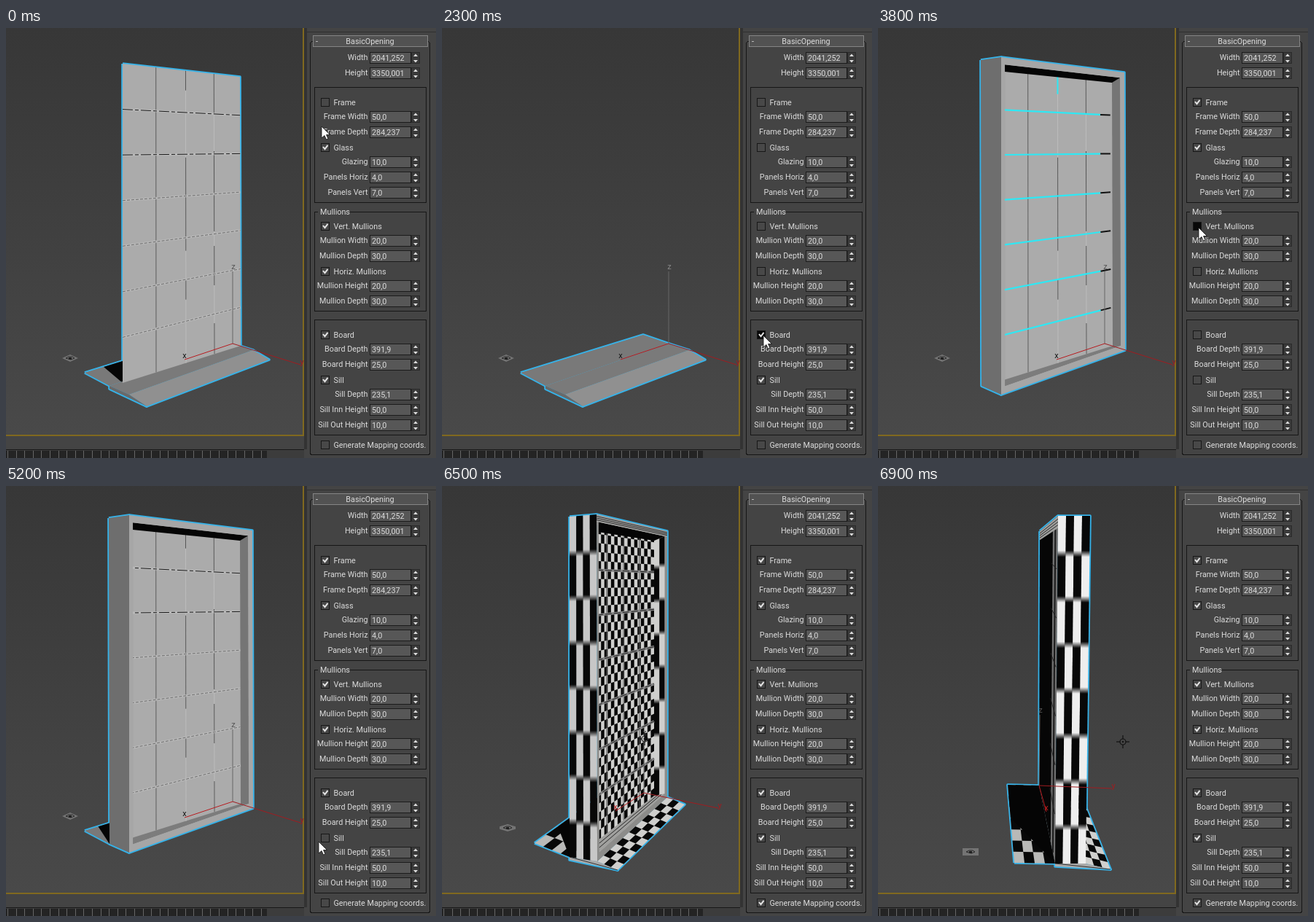
These frames come from a looping animation (590 by 590 pixels, 7000 ms). An HTML page with a canvas:

```html
<!DOCTYPE html>
<html lang="en">
<head>
<meta charset="utf-8">
<title>Window options</title>
<style>
html, body { margin: 0; width: 100%; height: 100%; overflow: hidden; background: #444; }
canvas, svg { position: absolute; left: 0; top: 0; width: 590px; height: 590px; }
text { font: 10.8px Roboto, sans-serif; fill: #dcdcdc; }
rect { shape-rendering: crispEdges; }
</style>
</head>
<body>
<canvas id="view" width="590" height="590"></canvas>
<svg id="panel" viewBox="0 0 590 590"></svg>
<script>
const LOOP = 7000, STEP = 100;
const ctx = document.getElementById('view').getContext('2d');
const panel = document.getElementById('panel');

// Option: initial state, then the times at which it flips
const options = {
  frame: [false, 3200],
  glass: [true, 300, 2700],
  vert: [true, 900, 3900],
  horiz: [true, 1700, 4300],
  board: [true, 2400, 5100],
  sill: [true, 2500, 5600],
  map: [false, 6200]
};
const isOn = (name, t) => {
  const [start, ...flips] = options[name];
  return start !== (flips.filter(f => f <= t).length % 2 === 1);
};
const isPressed = (name, t) => options[name].slice(1).some(f => t < f && f - t <= STEP);

// Pointer path: time, x, y
const pointer = [
  [0, 433, 135], [200, 438, 165], [300, 439, 166], [700, 441, 278], [900, 441, 278],
  [1500, 440, 338], [1700, 440, 338], [2000, 441, 422], [2300, 441, 422], [2500, 440, 484],
  [2700, 440, 166], [2900, 440, 166], [3200, 434, 97], [3300, 434, 97], [3500, 440, 274],
  [3900, 440, 274], [4100, 441, 336], [4400, 441, 336], [5000, 441, 420], [5100, 440, 424],
  [5200, 429, 488], [5400, 434, 484], [5600, 434, 484], [6000, 435, 571], [7000, 435, 571]
];

// Corner positions in the three key views of the orbit.
// l/r = left/right, f/b = front/back, t/b = top/bottom; g = glass
const views = {
  lbt: [141, 44, 175, 42, 247, 41],    lft: [169, 40, 212, 39, 291, 41],
  rft: [338, 61, 309, 62, 258, 62],    rbt: [311, 64, 277, 60, 222, 62],
  lbb: [142, 491, 175, 509, 243, 518], lfb: [169, 503, 213, 515, 285, 518],
  rfb: [339, 442, 309, 427, 255, 411], rbb: [311, 433, 277, 421, 221, 411],
  gtl: [160, 49, 200, 51, 276, 41],    gtr: [321, 67, 291, 67, 246, 62],
  gbr: [322, 436, 291, 425, 243, 411], gbl: [160, 487, 200, 497, 272, 518],
  boardNear: [108, 473, 127, 490, 187, 517], boardFar: [276, 421, 238, 410, 178, 410],
  sillNear: [193, 519, 241, 527, 319, 526],  sillFar: [361, 455, 333, 437, 275, 415],
  axisX: [245, 455, 238, 446, 231, 447],     axisY: [404, 462, 379, 442, 321, 415],
  axisZ: [311, 334, 277, 345, 222, 314],     eye: [88, 453, 90, 469, 127, 502]
};

const mix = (a, b, k) => a + (b - a) * k;
const mixPt = (p, q, k) => [mix(p[0], q[0], k), mix(p[1], q[1], k)];
const clamp = v => Math.max(0, Math.min(1, v));
const gray = v => `rgb(${v},${v},${v})`;

function poseAt(t) {
  const k = clamp((t - 6300) / 200) + clamp((t - 6500) / 400);
  const i = Math.min(1, Math.floor(k)) * 2;
  const pose = {};
  for (const [name, v] of Object.entries(views))
    pose[name] = mixPt([v[i], v[i + 1]], [v[i + 2], v[i + 3]], k - i / 2);
  return pose;
}

function pointerAt(t) {
  const i = pointer.findIndex(p => p[0] > t);
  const a = pointer[i - 1], b = pointer[i];
  return mixPt(a.slice(1), b.slice(1), (t - a[0]) / (b[0] - a[0]));
}

// Quads run top-left, top-right, bottom-right, bottom-left
const at = (q, u, v) => mixPt(mixPt(q[0], q[1], u), mixPt(q[3], q[2], u), v);
const part = (q, u0, v0, u1, v1) => [at(q, u0, v0), at(q, u1, v0), at(q, u1, v1), at(q, u0, v1)];

function trace(pts) {
  ctx.beginPath();
  pts.forEach(p => ctx.lineTo(...p));
}
function fill(pts, color) {
  trace(pts);
  ctx.closePath();
  ctx.fillStyle = color;
  ctx.fill();
}
function line(pts, color, width = 1, dash = []) {
  trace(pts);
  ctx.strokeStyle = color;
  ctx.lineWidth = width;
  ctx.setLineDash(dash);
  ctx.stroke();
  ctx.setLineDash([]);
}
function checker(q, cols, rows, light = '#cfcfcd') {
  fill(q, light);
  for (let r = 0; r < rows; r++)
    for (let c = 0; c < cols; c++)
      if ((r + c) % 2)
        fill(part(q, c / cols, r / rows, (c + 1) / cols, (r + 1) / rows), '#080808');
}
// Long columns of cells that blur into each other, cut off at both ends
function softChecker(q, cols, light) {
  const first = .17, span = 7.63, blur = .07;
  for (let c = 0; c < cols; c++) {
    const u = (c + .5) / cols;
    const shade = ctx.createLinearGradient(...at(q, u, 0), ...at(q, u, 1));
    for (let r = 0; r < 8; r++) {
      const color = (r + c) % 2 ? '#080808' : light;
      shade.addColorStop(clamp((r - first + blur) / span), color);
      shade.addColorStop(clamp((r + 1 - first - blur) / span), color);
    }
    fill(part(q, c / cols, 0, (c + 1) / cols, 1), shade);
  }
}
function stripes(q, count) {
  fill(q, '#a0a09e');
  for (let i = 1; i <= count; i++) {
    const v = i / (count + 1);
    line([at(q, 0, v), at(q, 1, v)], '#2a2a2a');
  }
}

const columns = [.284, .537, .778];
const rowsOf = [1, 2, 3, 4, 5, 6].map(k => k / 7);

function drawGlass(q, on) {
  if (on.map) checker(q, 20, 35);
  else fill(q, '#ababab');
  columns.forEach((u, i) => {
    const ends = [at(q, u, 0), at(q, u, 1)];
    line(ends, on.map ? '#555' : '#bcbcbc');
    if (!on.map) line(ends, '#555', 1, [[], [27, 92, 128, 40], [54, 52, 110, 20]][i]);
  });
  if (!on.vert) line([at(q, .537, 0), at(q, .537, .08)], '#2ee8f4', 2);
  rowsOf.forEach((v, i) => {
    const ends = [at(q, 0, v), at(q, 1, v)];
    if (!on.horiz) {
      line([ends[0], at(q, .9, v)], '#2ee8f4', 2.2);
      line([at(q, .9, v), at(q, .985, v)], '#111', 2);
    } else if (on.map) {
      line(ends, '#858585', 3.5);
      line(ends, '#222', 1, [9, 3]);
    } else {
      line(ends, '#b9b9b9', 3);
      line(ends, i < 2 ? '#161616' : '#6c6c6c', 1, i < 2 ? [14, 3, 5, 3] : [4, 2]);
    }
  });
}

function drawFront(front, glass, on) {
  fill(front, on.map ? '#8c8c8a' : '#a6a6a6');
  if (on.map) stripes(part(front, 0, 0, 1, .021), 3);
  const hole = part(front, .03, .021, .965, .979);
  const [a, b, c, d] = hole, [e, f, g, h] = part(glass, 0, .022, 1, 1);
  ctx.save();
  trace(hole);
  ctx.closePath();
  ctx.clip();
  fill(hole, on.map ? '#b4b4b2' : '#7c7c7c');
  if (on.map) {
    softChecker([f, b, c, g], 2, '#cfcfcd');
    stripes([h, g, c, d], 2);
  } else fill([f, b, c, g], '#757575');
  drawGlass(glass, on);
  fill([a, b, f, e, [e[0], a[1]]], '#050505');
  ctx.restore();
}

function drawBack(q) {
  fill(q, '#060606');
  fill(part(q, .72, 0, 1, 1), '#707070');
  line([at(q, .86, .03), at(q, .86, 1)], '#1a1a1a', 2);
  stripes(part(q, 0, 0, 1, .035), 3);
  rowsOf.forEach(v => line([at(q, .65, v - .01), at(q, .95, v + .01)], '#222'));
}

function drawModel(p, on) {
  const front = [p.lft, p.rft, p.rfb, p.lfb];
  const side = [p.lbt, p.lft, p.lfb, p.lbb];
  const back = [p.rbt, p.lbt, p.lbb, p.rbb];
  const glass = [p.gtl, p.gtr, p.gbr, p.gbl];
  const board = [p.boardNear, p.boardFar, p.rbb, p.lbb];
  const flat = [p.lbb, p.rbb, p.rfb, p.lfb];
  const slope = [p.lfb, p.rfb, p.sillFar, p.sillNear];
  const lip = [p.lbb, p.lfb, p.sillNear, [p.lbb[0], p.lbb[1] + 4]];
  const turn = clamp((p.rbb[0] - 311) / -90);
  const pieces = [];
  const add = (outline, paint) => pieces.push({ outline, paint });

  if (on.board) add(board, () => {
    if (on.map) checker(board, 7, 4, '#b9b9b7'); else fill(board, '#797979');
    if (on.frame || on.glass) {
      const u = on.frame ? .11 + .47 * turn : .155;
      fill([mixPt(p.boardNear, p.boardFar, u), p.boardFar, p.rbb, on.frame ? p.lbb : p.gbl], '#050505');
    }
  });
  if (on.sill) {
    add(flat, () => fill(flat, '#7a7a7a'));
    add(slope, () => on.map ? checker(slope, 11, 3) : fill(slope, '#909090'));
    add(lip, () => {
      fill(lip, on.map ? '#aaa' : '#696969');
      if (on.map) line([p.lbb, p.sillNear], '#333');
    });
  }
  if (on.frame) {
    if (p.rbt[0] < p.lbt[0]) add(back, () => drawBack(back));
    if (p.rft[0] > p.lft[0]) add(front, () => drawFront(front, glass, on));
    add(side, () => on.map ? softChecker(side, 4, gray(mix(175, 238, turn))) : fill(side, '#6e6e6e'));
  } else if (on.glass) add(glass, () => drawGlass(glass, on));

  // Selection halo stays visible only around the combined silhouette
  ctx.lineJoin = 'round';
  pieces.forEach(s => line([...s.outline, s.outline[0]], '#35b3ea', 3.6));
  pieces.forEach(s => s.paint());

  if (!on.glass) {
    const bars = [];
    if (on.vert) columns.forEach(u => bars.push([at(glass, u, .01), at(glass, u, .985)]));
    if (on.horiz) rowsOf.forEach(v => bars.push([at(glass, -.015, v), at(glass, 1.01, v)]));
    bars.forEach(b => line(b, '#249fd8', 8));
    bars.forEach(b => line(b, '#3c4850', 4.4));
    bars.forEach(b => line(b, '#aaa5a0', 3, [22, 1]));
  }
}

function label(text, x, y, color) {
  ctx.fillStyle = color;
  ctx.font = '11px Roboto, sans-serif';
  ctx.textAlign = 'center';
  ctx.fillText(text, x, y);
}

function drawAxes(p, on) {
  line([p.rbb, p.axisZ], '#666');
  line([p.rbb, p.axisX], '#b81c20');
  line([p.rbb, p.axisY], '#a01c20');
  const z = p.axisZ, x = p.axisX, y = p.axisY;
  label('z', z[0] + 1, z[1] - 3, on.glass ? '#555' : '#888');
  label('x', x[0], x[1] - 2, on.map ? '#c02020' : '#161616');
  label('y', y[0] + 2, y[1], '#a01c20');
}

function drawEye([x, y], turn) {
  const h = 5;
  fill([[x - 11, y - h * turn], [x, y - h], [x + 11, y - h * turn],
        [x + 11, y + h * turn], [x, y + h], [x - 11, y + h * turn]], '#747474');
  line([[x - 6, y], [x - 2, y - 2], [x + 3, y - 2], [x + 6, y], [x + 1, y + 2], [x - 6, y]], '#292929');
  fill([[x - 2, y - 1], [x + 2, y - 1], [x + 2, y + 2], [x - 2, y + 2]], '#222');
}

function drawViewport() {
  const shade = ctx.createLinearGradient(0, 0, 0, 558);
  shade.addColorStop(0, '#373737');
  shade.addColorStop(1, '#494949');
  const box = (x, y, w, h, color) => { ctx.fillStyle = color; ctx.fillRect(x, y, w, h); };
  box(0, 0, 590, 590, '#444');
  box(0, 0, 409, 560, '#80691f');
  box(0, 0, 407, 558, shade);
  box(409, 0, 4, 578, '#333');
  box(413, 5, 177, 1, '#303030');
  box(0, 578, 409, 12, '#3c3c3c');
  box(0, 578, 409, 1, '#181818');
  box(0, 580, 358, 10, '#242424');
  for (let x = 2; x < 358; x += 11.6) box(Math.round(x), 580, 1, 10, '#666');
}

function drawOrbitPointer(x, y) {
  ctx.strokeStyle = '#111';
  ctx.lineWidth = 1.2;
  ctx.beginPath();
  ctx.arc(x, y, 4, 0, 7);
  ctx.stroke();
  for (const [dx, dy] of [[1, 0], [-1, 0], [0, 1], [0, -1]])
    line([[x + dx * 4, y + dy * 4], [x + dx * 9, y + dy * 9]], '#111', 1.2);
  fill([[x - 1, y - 1], [x + 1, y - 1], [x + 1, y + 1], [x - 1, y + 1]], '#111');
}

function buildPanel() {
  const box = (x, y, w, h, color, edge) =>
    `<rect x="${x + .5}" y="${y + .5}" width="${w}" height="${h}" fill="${color}" stroke="${edge}"/>`;
  const text = (s, x, y, anchor = 'start') => `<text x="${x}" y="${y}" text-anchor="${anchor}">${s}</text>`;
  const group = (y, h) => box(423, y, 153, h, 'none', '#161616');
  const field = ([name, value, y]) => text(name, 496.5, y + 3, 'end') +
    box(499, y - 8, 56, 15, '#575757', '#1b1b1b') + text(value, 502, y + 4) +
    box(556, y - 8, 11, 15, '#3a3a3a', '#2a2a2a') +
    `<path d="M559 ${y - 2}l3-3.5 3 3.5zM559 ${y + 3}l3 3.5 3-3.5z" fill="#ddd"/>`;
  const check = ([id, name, y]) => `<g id="${id}">` + box(432, y - 6, 11, 11, '#484848', '#171717') +
    `<path d="M435 ${y - 1}l2.5 3.2 4-5.4" fill="none" stroke="#e4e4e4" stroke-width="2"/></g>` +
    text(name, 449.5, y + 4);

  const fields = [
    ['Width', '2041,252', 41], ['Height', '3350,001', 62],
    ['Frame Width', '50,0', 122], ['Frame Depth', '284,237', 143],
    ['Glazing', '10,0', 184], ['Panels Horiz', '4,0', 205], ['Panels Vert', '7,0', 226],
    ['Mullion Width', '20,0', 292], ['Mullion Depth', '30,0', 313],
    ['Mullion Height', '20,0', 354], ['Mullion Depth', '30,0', 375],
    ['Board Depth', '391,9', 441], ['Board Height', '25,0', 462],
    ['Sill Depth', '235,1', 503], ['Sill Inn Height', '50,0', 524], ['Sill Out Height', '10,0', 545]
  ];
  const checks = [
    ['frame', 'Frame', 102], ['glass', 'Glass', 164], ['vert', 'Vert. Mullions', 272],
    ['horiz', 'Horiz. Mullions', 334], ['board', 'Board', 421], ['sill', 'Sill', 483],
    ['map', 'Generate Mapping coords.', 572]
  ];
  panel.innerHTML =
    `<rect x="417.5" y="18.5" width="164" height="567" rx="3" fill="none" stroke="#161616"/>` +
    box(421, 10, 157, 15, '#525252', '#858585') +
    text('-', 425, 22) + text('BasicOpening', 499.5, 22, 'middle') +
    group(81, 158) + group(252, 136) + group(400, 158) +
    '<rect x="428" y="247" width="44" height="11" fill="#444"/>' + text('Mullions', 431, 256) +
    fields.map(field).join('') + checks.map(check).join('') +
    '<path id="arrow" d="M0 0V16L4 12.5 6.5 18 9 17 6.5 11.5H11.5Z" fill="#fff" stroke="#111" stroke-width=".8"/>';
}

function render(t) {
  const on = {};
  for (const name in options) {
    on[name] = isOn(name, t);
    const node = document.getElementById(name);
    node.children[0].setAttribute('fill', isPressed(name, t) ? '#080808' : '#484848');
    node.children[1].setAttribute('visibility', on[name] ? 'visible' : 'hidden');
  }
  const pose = poseAt(t);
  drawViewport();
  drawModel(pose, on);
  drawAxes(pose, on);
  drawEye(pose.eye, clamp((t - 6300) / 600));

  const orbiting = t >= 6400;
  const arrow = document.getElementById('arrow');
  arrow.setAttribute('visibility', orbiting ? 'hidden' : 'visible');
  arrow.setAttribute('transform', `translate(${pointerAt(t).join(' ')})`);
  if (orbiting) drawOrbitPointer(278 + (t - 6500) * .145, 347 + (t - 6500) * .01);
}

buildPanel();
let start, shown;
function tick(now) {
  start ??= now;
  const t = Math.floor(((now - start) % LOOP) / STEP) * STEP;
  if (t !== shown) render(shown = t);
  requestAnimationFrame(tick);
}
render(shown = 0);
requestAnimationFrame(tick);
</script>
</body>
</html>
```
